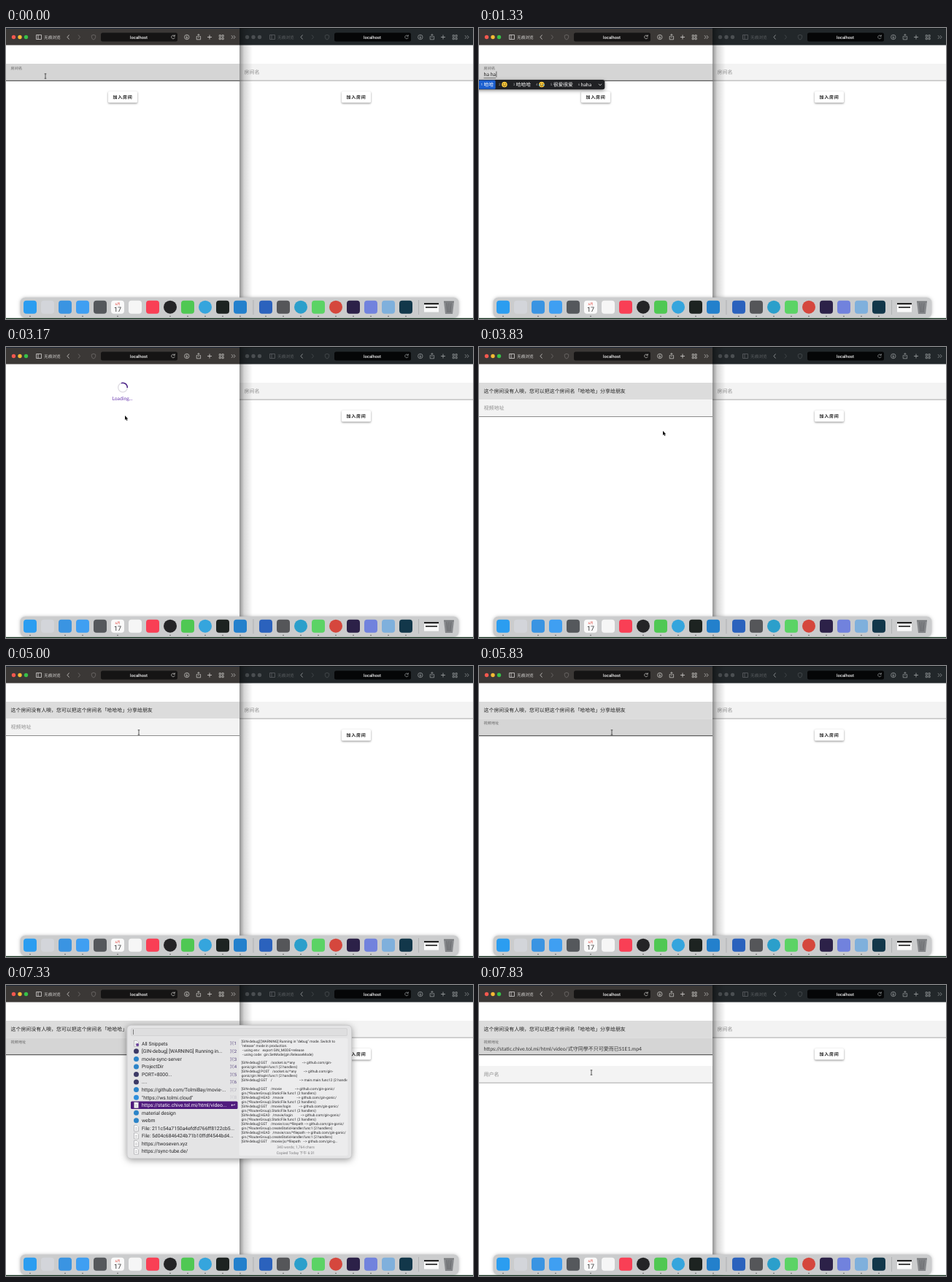
Recreate the animation shown at these times as an HTML page with a canvas. Size 640 px wide and 399 px high, loop 8 s.

```html
<!DOCTYPE html>
<html lang="zh">
<head>
<meta charset="utf-8">
<title>房间</title>
<style>
html, body { margin: 0; width: 100%; height: 100%; overflow: hidden; background: #fff; }
canvas { display: block; width: 640px; height: 399px; }
</style>
</head>
<body>
<canvas id="stage"></canvas>
<script>
const LOOP = 8000, STEP = 1000 / 6;
const canvas = document.getElementById('stage');
const ctx = canvas.getContext('2d');
const scale = window.devicePixelRatio || 1;
canvas.width = 640 * scale;
canvas.height = 399 * scale;
ctx.scale(scale, scale);
ctx.textRendering = 'geometricPrecision';

const PAGE = 'Lato, "Noto Sans CJK SC", "Noto Sans CJK", sans-serif';
const UI = 'Roboto, "Noto Sans CJK SC", "Noto Sans CJK", "DejaVu Sans", sans-serif';

function rect(x, y, w, h, color, radius = 0) {
  ctx.fillStyle = color;
  ctx.beginPath();
  ctx.roundRect(x, y, w, h, radius);
  ctx.fill();
}

function dot(x, y, r, color) {
  ctx.fillStyle = color;
  ctx.beginPath();
  ctx.arc(x, y, r, 0, Math.PI * 2);
  ctx.fill();
}

function line(path, color, width = 0.8) {
  ctx.strokeStyle = color;
  ctx.lineWidth = width;
  ctx.stroke(new Path2D(path));
}

// y is the vertical middle of the text; returns its width
function text(s, x, y, size, color, { font = PAGE, align = 'left', weight = 400, spacing = 0 } = {}) {
  ctx.font = `${weight} ${size}px ${font}`;
  ctx.letterSpacing = spacing + 'px';
  ctx.textAlign = align;
  ctx.fillStyle = color;
  ctx.fillText(s, x, y + size * 0.36);
  return ctx.measureText(s).width;
}

function shadowed(blur, dy, color, draw) {
  ctx.save();
  ctx.shadowBlur = blur * scale;
  ctx.shadowOffsetY = dy * scale;
  ctx.shadowColor = color;
  draw();
  ctx.restore();
}

function titleBar(x, active) {
  const ink = active ? '#d6d4d2' : '#a3a6a8';
  const dim = active ? '#716e6c' : '#4a4e51';
  const label = active ? '#d6d4d2' : '#5b5f62';
  ctx.save();
  ctx.translate(x, 0);
  rect(0, 0, 320, 23.5, active ? '#3b3836' : '#22272a');
  rect(0, 0, 320, 1, active ? '#1b2535' : '#15191c');
  ['#f4584f', '#f6b935', '#38c149'].forEach((c, i) => dot(10.5 + i * 8.5, 12.5, 2.7, active ? c : '#4b4f52'));
  line('M41.5 9.5h7v6h-7zM44 9.5v6', label);
  text('无痕浏览', 52, 12.5, 5.7, label, { font: UI, weight: 500 });
  line('M86.5 9.5l-2.5 3l2.5 3', ink);
  line('M99 9.5l2.5 3l-2.5 3', dim);
  line('M120 9.3l2.7 1v2.2q0 2.4-2.7 3.6q-2.7-1.2-2.7-3.6v-2.2z', dim);
  rect(130, 6.5, 105, 12, active ? '#151414' : '#050607', 2.5);
  text('localhost', 182, 12.5, 5.8, '#f2f2f2', { font: UI, align: 'center', weight: 500 });
  line('M231 11.2a2.3 2.3 0 1 0 .2 2M231.3 9.3v2h-2', ink, 0.7);
  line('M251 12.5a3.2 3.2 0 1 1-6.4 0a3.2 3.2 0 1 1 6.4 0M247.8 10.5v3.6M246.4 12.8l1.4 1.4l1.4-1.4', ink, 0.7);
  line('M262.5 11.5h-1.3v4.3h5.4v-4.3h-1.3M263.9 13.5v-5M262.4 10l1.5-1.5l1.5 1.5', ink, 0.7);
  line('M276 12.5h6M279 9.5v6', ink);
  line('M292.2 9.7h2.2v2.2h-2.2zM296 9.7h2.2v2.2h-2.2zM292.2 13.5h2.2v2.2h-2.2zM296 13.5h2.2v2.2h-2.2z', ink, 0.7);
  line('M309 10.2l2 2.3l-2 2.3M312 10.2l2 2.3l-2 2.3', ink, 0.7);
  ctx.restore();
}

function field(x, y, label, { focused = false, floated = focused } = {}) {
  rect(x, y, 320, 23, focused ? '#d5d5d5' : '#f3f3f3');
  rect(x, y + 22.8, 320, focused ? 1.2 : 0.8, focused ? '#5c5c5c' : '#8c8c8c');
  if (floated) text(label, x + 6.5, y + 6, 5.2, '#666');
  else text(label, x + 6.5, y + 11.3, 7, '#8d8d8d');
}

function joinButton(x) {
  shadowed(2.5, 1, 'rgba(0,0,0,.45)', () => rect(x + 140, 87, 40, 15.5, '#fff', 1.5));
  text('加入房间', x + 146.5, 95, 6, '#1c1c1c', { weight: 700, spacing: 0.75 });
}

// ---- input method ----
const TYPING = [[830, 'h'], [1000, 'ha'], [1170, 'ha h'], [1330, 'ha ha'], [1500, 'ha ha h'], [1670, 'ha ha ha']];
const candidates = typed => typed.length < 3
  ? ['哈', '还', '好', '和', '会', typed]
  : typed.length < 6
    ? ['哈哈', ':)', '哈哈哈', ':D', '很爱很爱', 'haha']
    : ['哈哈哈', ':D', '哈哈', '哈哈哈哈', 'hahaha'];

function emoji(x, y, laughing) {
  dot(x, y, 3.8, '#f8c83a');
  dot(x - 1.4, y - 0.9, 0.6, '#5a3b12');
  dot(x + 1.4, y - 0.9, 0.6, '#5a3b12');
  line(`M${x - 2} ${y + 0.8}q2 2.6 4 0`, '#5a3b12', 0.8);
  if (laughing) [-3, 3].forEach(d => dot(x + d, y + 0.8, 1, '#58b3ef'));
}

function candidateBar(words) {
  const gap = 6.8, y = 77.5;
  ctx.font = `400 6.8px ${PAGE}`;
  ctx.letterSpacing = '0px';
  const widths = words.map(w => w[0] === ':' ? 9 : ctx.measureText(w).width);
  const total = widths.reduce((sum, w) => sum + w + 4 + gap, 3) + 11;
  shadowed(5, 1.5, 'rgba(0,0,0,.45)', () => rect(-4, 71, total + 4, 13.2, '#202124', 3));
  rect(0, 71.5, widths[0] + 9, 12.2, '#1b5fd0', 1.5);
  let x = 2.5;
  words.forEach((word, i) => {
    text(i + 1, x, y, 4.6, i ? '#9a9b9e' : '#fff', { font: UI });
    if (word[0] === ':') emoji(x + 8, y, word === ':D');
    else text(word, x + 4, y, 6.8, '#fff');
    x += widths[i] + 4 + gap;
  });
  line(`M${total - 8.5} 76.7l2.2 2l2.2-2`, '#ddd', 0.8);
}

function roomName(t) {
  if (t < 830) return;
  const typed = TYPING.filter(([at]) => at <= t).pop()[1];
  const composing = t < 1830;
  const w = text(composing ? typed : '哈哈哈', 6.5, 63.5, 7, '#222');
  rect(7 + w, 59.5, 0.7, 8, '#333');
  if (composing) {
    rect(6.5, 68, w, 0.7, '#555');
    candidateBar(candidates(typed));
  }
}

// ---- clipboard panel ----
const SNIPPETS = ['All Snippets', '[GIN-debug] [WARNING] Running in...', 'movie-sync-server', 'ProjectDir',
  'PORT=8000...', '....', 'https://github.com/TolmiBay/movie-...', '"https://ws.tolmi.cloud"',
  'https://static.chive.tol.mi/html/video...', 'material design', 'webm',
  'File: 211c54a7150a4efdfd766ff8122cb5...', 'File: 5d04c6846424b71b10ffdf4544bd4...',
  'https://twoseven.xyz', 'https://sync-tube.de/'];
const APP_COLORS = ['', '#3d3a66', '#2c84c8', '#2c84c8', '#3d3a66', '#3d3a66', '#2c84c8', '#2f8fdc', '', '#2c84c8', '#2c84c8'];

const route = (verb, path, handler) => [
  `[GIN-debug] ${verb.padEnd(6)} ${path.padEnd(20)}   --> github.com/gin-`,
  'gonic/' + handler + ' (2 handlers)'];
const group = (verb, path, fn) => {
  const tail = `gin.(*RouterGroup).${fn}.func1 (2 handlers)`;
  return [`[GIN-debug] ${verb.padEnd(6)} ${path.padEnd(20)} --> github.com/gin-gonic/`, tail];
};
const PREVIEW = [
  '[GIN-debug] [WARNING] Running in "debug" mode. Switch to', '"release" mode in production.',
  ' - using env:   export GIN_MODE=release', ' - using code:  gin.SetMode(gin.ReleaseMode)', '',
  ...route('GET', '/socket.io/*any', 'gin.WrapH.func1'),
  ...route('POST', '/socket.io/*any', 'gin.WrapH.func1'),
  '[GIN-debug] GET    /                               --> main.main.func12 (2 handlers)', '',
  ...group('GET', '/movie', 'StaticFile'), ...group('HEAD', '/movie', 'StaticFile'),
  ...group('GET', '/movie/login', 'StaticFile'), ...group('HEAD', '/movie/login', 'StaticFile'),
  ...group('GET', '/movie/css/*filepath', 'createStaticHandler'),
  ...group('HEAD', '/movie/css/*filepath', 'createStaticHandler'),
  '[GIN-debug] GET    /movie/js/*filepath   --> github.com/gin-g...'];

function snippetIcon(i, x, y) {
  if (APP_COLORS[i]) return dot(x, y, 3.5, APP_COLORS[i]);
  rect(x - 3, y - 4, 6, 8, '#fafafa', 0.6);
  line(`M${x - 3} ${y - 4}h4l2 2v6h-6zM${x - 1.6} ${y - 0.5}h3M${x - 1.6} ${y + 1.5}h3`, '#8b8b90', 0.5);
  if (!i) dot(x + 1.6, y + 1.8, 2, '#6a3f9b');
}

function clipboardPanel(selected) {
  shadowed(10, 2, 'rgba(0,0,0,.4)', () => rect(165.5, 55, 308.5, 183, '#e4e4e5', 6));
  line('M171.5 55.3h296.5q5.5 0 5.5 5.5v171.5q0 5.5-5.5 5.5h-296.5q-5.5 0-5.5-5.5v-171.5q0-5.5 5.5-5.5z', '#c3c3c5', 0.7);
  rect(171, 59, 297, 11, '#d3d3d4', 2);
  rect(172, 60, 295, 9, '#dededf', 1.5);
  rect(174, 61, 0.7, 7, '#555');
  rect(319.5, 73, 149, 161, '#ececed', 2);
  SNIPPETS.forEach((name, i) => {
    const y = 80.3 + i * 10.55, on = i === selected;
    if (on) rect(171, y - 5.2, 146.5, 10.4, '#4f1a7d', 1.5);
    snippetIcon(i, 178.5, y);
    text(name, 186, y, 6.8, on ? '#fff' : '#252527', { font: UI });
    if (on) text('↩', 314, y, 7, '#fff', { font: UI, align: 'right' });
    else if (i < 9) text('⌘' + (i + 1), 316, y, 6, i > 6 ? '#c3c1c9' : i > 5 ? '#9c98aa' : '#55427c', { font: UI, align: 'right' });
  });
  ctx.save();
  ctx.beginPath();
  ctx.rect(320, 70, 147.5, 168);
  ctx.clip();
  PREVIEW.forEach((s, i) => text(s, 322.5, 77 + i * 5.95, 4.85, '#2c2c2e', { font: UI }));
  ctx.restore();
  text('340 words; 1,764 chars', 397, 222.3, 5, '#77777a', { font: UI, align: 'center' });
  text('Copied Today 下午 6:31', 397, 229.7, 5, '#77777a', { font: UI, align: 'center' });
}

// ---- pages of the left window ----
function loading(t) {
  const turn = (t - 2330) / 1000 * Math.PI * 2;
  line('M166.3 55.5a6.3 6.3 0 1 1-12.6 0a6.3 6.3 0 1 1 12.6 0', '#dedbe2', 1.3);
  ctx.strokeStyle = '#4b2388';
  ctx.lineWidth = 1.5;
  ctx.beginPath();
  ctx.arc(160, 55.5, 6.3, turn - 0.9, turn + 1.1);
  ctx.stroke();
  text('Loading...', 159.5, 70.5, 6.8, '#6b3bb0', { align: 'center' });
}

function room(t) {
  const focused = t >= 5330, pasted = t >= 7500;
  rect(0, 49, 320, 23, '#dcdcdc');
  text('这个房间没有人噢，您可以把这个房间名「哈哈哈」分享给朋友', 6.5, 60.5, 6.95, '#222');
  field(0, 72.3, '视频地址', { focused });
  if (pasted) {
    text('https://static.chive.tol.mi/html/video/式守同學不只可愛而已S1E1.mp4', 6.5, 87, 7, '#333');
    field(0, 111, '用户名');
  }
}

function leftPage(t) {
  if (t < 2330) {
    field(0, 49, '房间名', { focused: true });
    joinButton(0);
    roomName(t);
  } else if (t < 3170) loading(t);
  else room(t);
}

// ---- pointer ----
const POINTER = [[0, 54, 66], [1830, 54, 66], [2170, 164, 97], [3170, 164, 97], [3670, 253, 118],
  [4330, 253, 118], [5000, 182, 91], [7330, 182, 91], [7830, 154, 120], [8000, 154, 120]];

function pointer(t) {
  if (t >= 830 && t < 2000) return;
  const i = POINTER.findIndex(([at]) => at > t);
  const [t0, x0, y0] = POINTER[i - 1], [t1, x1, y1] = POINTER[i];
  const p = (t - t0) / (t1 - t0), ease = p * p * (3 - 2 * p);
  const x = x0 + (x1 - x0) * ease, y = y0 + (y1 - y0) * ease;
  if (t < 830 || t >= 5000) {
    line(`M${x - 1.3} ${y - 3.2}h2.6M${x} ${y - 3.2}v6.4M${x - 1.3} ${y + 3.2}h2.6`, '#333', 0.8);
  } else {
    const arrow = `M${x - 1} ${y - 3}v6l1.4-1.2l1 2.3l1.1-.5l-1-2.2h1.8z`;
    line(arrow, '#fff', 1.2);
    ctx.fillStyle = '#111';
    ctx.fill(new Path2D(arrow));
  }
}

// ---- dock ----
const DOCK = ['#2b9df0', '#d3d5da', '#3a94e2', '#3f9ff2', '#55585c', '', '#f6f6f6', '#f93f55', 'o#242426',
  '#4fc853', 'o#35a5dd', '#1d2321', '#2380cc', '#2b62bd', '#555659', 'o#2b9fcb', '#5bd365', 'o#d5473d',
  '#2c2148', '#7182dd', '#7fb0dc', '#12374a'];

function dock() {
  shadowed(4, 0, 'rgba(0,0,0,.25)', () => rect(19.5, 369.5, 601, 28, '#cbcccd', 7));
  DOCK.forEach((color, i) => {
    const x = i < 13 ? 33 + i * 24 : 356 + (i - 13) * 24;
    if (color[0] === 'o') dot(x, 382.7, 9, color.slice(1));
    else rect(x - 9, 373.7, 18, 18, color || '#fafafa', 4);
    if (!color) {
      text('6月', x, 378, 4.5, '#e0453c', { align: 'center' });
      text('17', x, 385.5, 9, '#333', { font: UI, align: 'center' });
    }
    if (![1, 4, 6, 7].includes(i)) dot(x, 395.2, 0.7, '#444');
  });
  rect(338.6, 373, 0.7, 20, '#a5a6a8');
  rect(565, 373, 0.7, 20, '#a5a6a8');
  rect(573, 377, 20, 12.5, '#fafafa');
  rect(573, 377, 20, 2.2, '#222');
  rect(575, 382, 16, 2, '#444');
  ctx.fillStyle = '#85878a';
  ctx.fill(new Path2D('M600 375h14l-2 17h-10z'));
  line('M600 375h14M604 377l1 13M607 377v13M610 377l-1 13', '#5c5e61', 0.8);
}

function draw(t) {
  rect(0, 0, 640, 399, '#fff');
  titleBar(320, false);
  field(320, 49, '房间名');
  joinButton(320);
  const shade = ctx.createLinearGradient(320, 0, 338, 0);
  shade.addColorStop(0, 'rgba(0,0,0,.42)');
  shade.addColorStop(0.35, 'rgba(0,0,0,.16)');
  shade.addColorStop(1, 'rgba(0,0,0,0)');
  rect(320, 0, 18, 399, shade);
  rect(0, 0, 320, 399, '#fff');
  titleBar(0, true);
  leftPage(t);
  if (t >= 6000 && t < 7500) {
    const selected = t < 7000 ? 1 : t < 7170 ? 3 : t < 7330 ? 5 : 8;
    clipboardPanel(selected);
  } else pointer(t);
  dock();
  rect(0, 397.8, 640, 1.2, '#12301c');
}

function frame(now) {
  const t = Math.floor((now % LOOP + 5) / STEP) * STEP;
  draw(Math.min(t + 0.5, LOOP - 1));
  requestAnimationFrame(frame);
}
requestAnimationFrame(frame);
</script>
</body>
</html>
```
